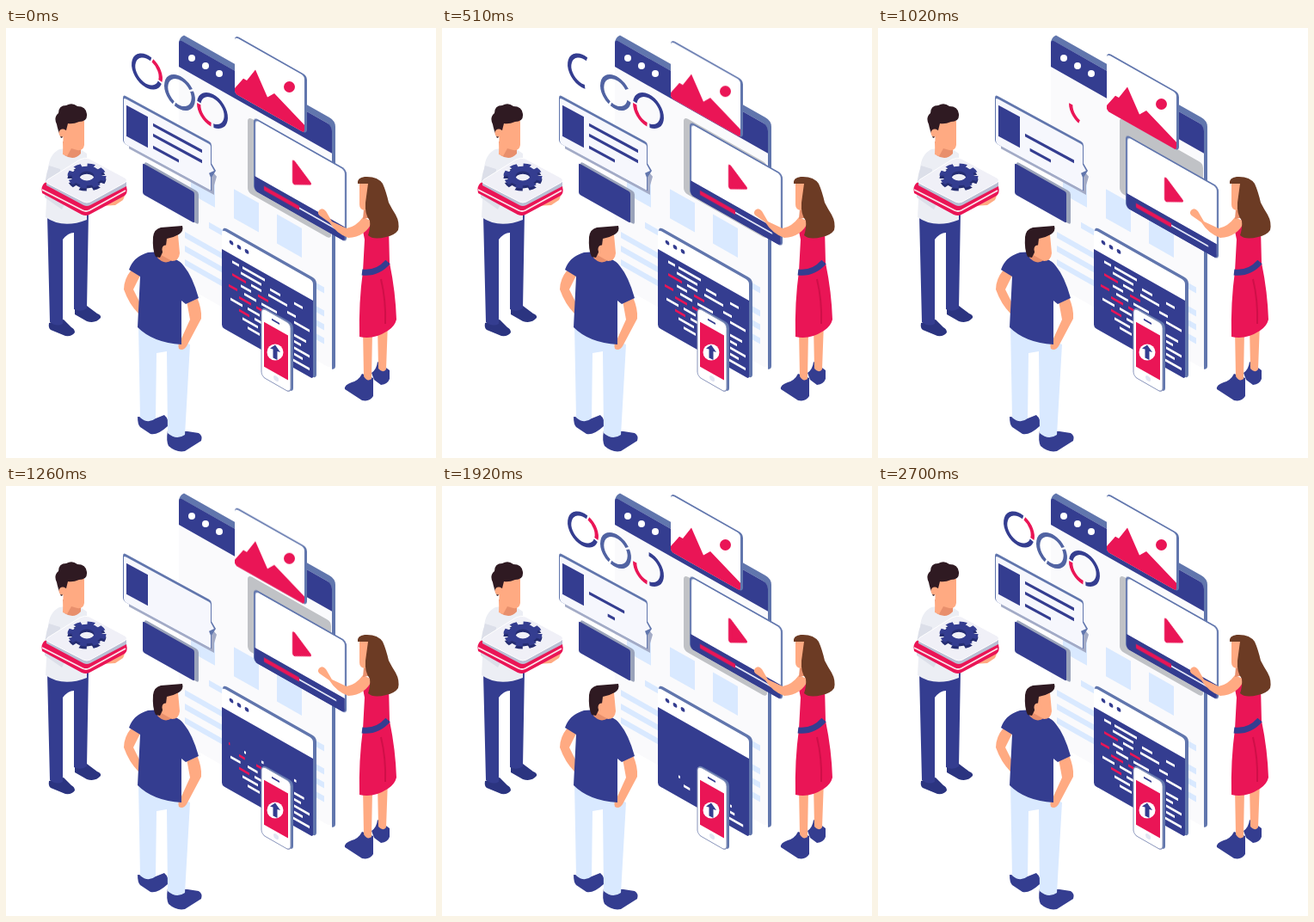
Write an HTML page that moves like this. It is 500 px wide and 500 px high and loops after 2.73 s.

```html
<!DOCTYPE html>
<html lang="en">
<head>
<meta charset="utf-8">
<title>Team building an interface</title>
<style>
  html, body { margin: 0; height: 100%; overflow: hidden; background: #fff; }
  svg { display: block; width: 100%; height: 100%; }
  .blue { fill: #343d90; }
  .navy { fill: #2b3480; }
  .edge { fill: #6176ad; }
  .red { fill: #ea1556; }
  .pale { fill: #d9e9ff; }
  .face { fill: #fafafc; }
  .white { fill: #fff; }
  .skin { fill: #ffaa82; }
  .shade { fill: #e88f6c; }
  .hair { fill: #2f1a22; }
  .line { fill: none; stroke: #343d90; stroke-width: 3.6; }
  .bob { animation: bob 2730ms infinite; }
  @keyframes bob {
    0%, 8.4% { transform: none; animation-timing-function: ease-in-out; }
    37.7%, 39.6% { transform: translateY(20px); animation-timing-function: ease-in-out; }
    60.1%, 100% { transform: none; }
  }
</style>
</head>
<body>
<svg viewBox="0 0 500 500">
  <defs id="defs"></defs>

  <!-- page -->
  <g transform="translate(201 13) skewY(29.5)">
    <path class="edge" d="M0 5Q0-2 6-8H175q7 0 7 7V277q0 4-4 6V20z"/>
    <rect class="face" width="178" height="283" rx="6"/>
    <path class="blue" d="M0 32V5q0-5 5-5h167q6 0 6 6v26z"/>
    <g class="pale">
      <rect x="14" y="139" width="28" height="33"/>
      <rect x="64" y="138" width="29" height="34"/>
      <rect x="114" y="139" width="29" height="34"/>
      <rect x="35" y="193" width="134" height="7"/>
      <rect x="7" y="220" width="162" height="7"/>
      <rect x="7" y="236" width="162" height="7"/>
      <rect x="7" y="252" width="162" height="7"/>
    </g>
  </g>
  <g class="white">
    <circle cx="216" cy="35" r="4"/>
    <circle cx="232" cy="44" r="4"/>
    <circle cx="248" cy="53" r="4"/>
  </g>
  <rect transform="translate(281 103) skewY(29.5)" width="97" height="88" rx="5" fill="#c0c2c6"/>

  <g id="rings"></g>

  <!-- speech bubble -->
  <g transform="translate(137 80) skewY(28.5)">
    <path fill="#a3abc6" d="M6 3H102V30l6 4-3 12v11H6z"/>
    <path class="edge" d="M2-2H99q3 0 3 3V22l5 6-5 10V54H3q-4 0-4-4V2q0-4 3-4z"/>
    <path fill="#f6f7fd" d="M3 1H99q2 0 2 2V24l4 5-6 6 2 4V54H3q-3 0-3-3V3q0-2 3-2z"/>
    <rect class="blue" x="3" y="8" width="25" height="36"/>
    <path id="text1" class="line" d="M34 14H91" pathLength="100"/>
    <path id="text2" class="line" d="M34 26H91" pathLength="100"/>
    <path id="text3" class="line" d="M34 40H64" pathLength="100"/>
  </g>

  <!-- label -->
  <g transform="translate(159 157) skewY(29.5)">
    <rect fill="#9aa3ba" x="2" y="-3" width="63" height="38" rx="3"/>
    <rect class="blue" width="60" height="36" rx="2"/>
  </g>

  <!-- picture -->
  <g class="bob">
    <g transform="translate(266 10) skewY(29.5)">
      <rect class="edge" y="-2" width="84" height="68" rx="5"/>
      <rect class="white" width="81" height="66" rx="4"/>
      <path class="red" d="M0 64V60L10 43h4L24 25 38 49 46 40 81 57v6q0 3-3 3H2z"/>
    </g>
    <circle class="red" cx="329.500" cy="68.500" r="6.500"/>
  </g>

  <!-- video -->
  <g class="bob">
    <g transform="translate(289 106) skewY(29.5)">
      <rect class="edge" x="-1" y="-2" width="108" height="85" rx="5"/>
      <rect class="white" x="1" width="104" height="81" rx="4"/>
      <path class="blue" d="M0 66H105V79q0 4-4 4H4q-4 0-4-4z"/>
      <path class="red" d="M46 24V48L64 38z" stroke="#ea1556" stroke-width="4" stroke-linejoin="round"/>
      <path d="M52 74H95" stroke="#dfe3f5" stroke-width="2"/>
      <path d="M11 74H52" stroke="#ea1556" stroke-width="5"/>
    </g>
  </g>

  <!-- code window -->
  <g transform="translate(251 234) skewY(29.5)">
    <rect class="edge" x="1" y="-4" width="109" height="116" rx="5"/>
    <rect class="white" width="106" height="113" rx="4"/>
    <path class="blue" d="M0 23H106V111q0 3-3 3H3q-3 0-3-3z"/>
    <g class="blue">
      <circle cx="11" cy="9.500" r="2.400"/>
      <circle cx="20" cy="9.500" r="2.400"/>
      <circle cx="29" cy="9.500" r="2.400"/>
    </g>
    <g id="code" fill="none" stroke-width="3"></g>
  </g>

  <!-- phone -->
  <g transform="translate(297 325) skewY(29.5)">
    <rect class="edge" x="1" y="-2" width="36" height="80" rx="5"/>
    <rect class="white" width="34" height="80" rx="5" stroke="#8793ba"/>
    <rect class="red" x="3" y="15" width="28" height="52"/>
    <path d="M12 7H21" stroke="#343d90" stroke-width="2"/>
    <circle cx="17" cy="73" r="3" fill="#e1e5f2"/>
  </g>
  <circle class="white" cx="313" cy="377" r="9.500"/>
  <path class="blue" d="M313 368.500l6 8.500-3.500-1v10l-5-2.500v-10l-3.500-1z"/>

  <!-- man with the gear -->
  <g>
    <path class="navy" d="M50 343q-1 6 2 8l17 7q8 1 11-4 0-4-4-6l-9-9zM80 325v8l14 8q10 3 16-4 1-3-4-5l-12-9z"/>
    <path class="blue" d="M48 218L51 342q8 6 15 2V246q6-8 13-8V327q8 4 15-1L96 214z"/>
    <path fill="#eceef4" d="M62 141q-12 6-13 23l-3 56q20 14 48 3V146L82 138z"/>
    <path class="shade" d="M66 132H87V146q-8 9-19 2z"/>
    <path class="skin" d="M67 108H91V136q-1 7-8 6l-7-2-5 9-5-2z"/>
    <path class="hair" d="M64 128q-4-10-5-16-4-8 2-13 0-9 9-9 7-4 13 1 10 0 11 9 1 9-9 9-7 3-13 2l-2 8q-6-2-4 8z"/>
    <circle class="skin" cx="66" cy="122" r="4.500"/>
    <path class="skin" d="M96 209l20-12 18-6q6 3 2 9l-9 6-16 1-11 6z"/>
    <path fill="#dcdfe9" d="M50 160q-6 17-5 37l20 14 5-10-8-13 1-24z"/>
    <path class="red" d="M45 180q-5 4-3 12L88 217q5 2 9 0l41-22q4-3 2-11L93 170z"/>
    <path d="M42 188L89 212q4 2 8 0l42-23" fill="none" stroke="#fbe3ea" stroke-width="1.800"/>
    <path fill="#b9bfd4" d="M47 178v5L90 206q4 2 8 0l42-22v-5z"/>
    <path fill="#f0f0f7" d="M49 176L86 153q6-3 11-1l41 22q5 3 0 6L98 202q-4 2-8 0L49 181q-4-2 0-5z" stroke="#fff"/>
    <g transform="translate(94 172) scale(1 .64)" fill="none">
      <g id="gear" stroke="#252d72" transform="translate(0 5)">
        <circle r="13" stroke-width="9"/>
        <circle r="19.500" stroke-width="6" stroke-dasharray="8.300 7.015"/>
      </g>
      <g stroke="#343d90">
        <circle r="13" stroke-width="9"/>
        <circle r="19.500" stroke-width="6" stroke-dasharray="8.300 7.015"/>
      </g>
    </g>
  </g>

  <!-- man with hands on hips -->
  <g>
    <path class="blue" d="M153 452q0 9 3 12l12 8q8 2 20-9 2-8-4-13l-10 4zM188 468q-2 12 1 18 9 8 19 6l19-12q2-6-3-9l-13-2z"/>
    <path class="pale" d="M154 345l2 108q9 8 18 1l1-76 12-2 1 95q10 9 20 2l6-105z"/>
    <path class="skin" d="M146 281q-9 11-9 23 6 17 17 28l2-12-8-16 8-16zM210 317l12-4q6 14 5 25l-17 32q-4 6-9 3-2-6 3-12l10-22z"/>
    <path class="blue" d="M165 261q-17 5-22 20l13 8-3 59q18 18 51 20V317l5 4 15-7q-7-25-17-37-4-6-12-9l-14-8z"/>
    <path class="shade" d="M176 255h17v15q-9 6-17-3z"/>
    <path class="skin" d="M178 240h22l2 22q-1 9-9 9l-16-9z"/>
    <path class="hair" d="M174 266q-4-8-3-23 1-9 9-11l25-2q2 6-4 10-7 4-14 5l-1 8q-5-1-4 8l-3 6z"/>
    <circle class="skin" cx="186" cy="257" r="4.500"/>
  </g>

  <!-- woman -->
  <g>
    <path class="blue" d="M414 402q-4 8-12 10-9 3-8 8l20 13q9 2 13-5V407zM432 388q-1 9-7 13l3 8 8 6q8-1 10-7v-10z"/>
    <path class="skin" d="M415 350l1 55q4 7 9 3l1-55zM432 345l1 51q5 6 9 1l2-55z"/>
    <path class="red" d="M424 221l-9 15 2 10-2 37q-5 36-4 76 16 4 33-7 8-5 10-13-1-32-8-66l-1-40-8-15z"/>
    <path class="skin" d="M364 212q4-4 8 1l7 12 17 8q11-2 19-13l11 5q-8 18-28 19-14-5-22-18l-10-7q-5-3-2-7z"/>
    <path d="M414 284q18 2 30-12" fill="none" stroke="#343d90" stroke-width="7"/>
    <path d="M436 292q6 25 5 52" fill="none" stroke="#cf0f48" stroke-width="2"/>
    <path class="shade" d="M417 200h10v20l-12 2z"/>
    <path class="skin" d="M411 181h14v30l-8 1q-6-1-6-7z"/>
    <path fill="#6c3b24" d="M409 181q-1-7 8-8 15-1 21 8 4 9 7 22 3 6 8 14 5 9 3 18-4 6-14 8-15 4-21-2 3-9 2-17-6-7-5-21l3-22z"/>
  </g>
</svg>
<script>
const LOOP = 2730;
const BLUE = '#343d90', RED = '#ea1556', STEEL = '#5163a2';
const $ = id => document.getElementById(id);

function add(parent, tag, attrs) {
  const el = document.createElementNS('http://www.w3.org/2000/svg', tag);
  for (const k in attrs) el.setAttribute(k, attrs[k]);
  return parent.appendChild(el);
}

// Undraw a stroke between out[0] and out[1], redraw it between back[0] and back[1] (ms).
function redraw(el, out, back, hidden = 101) {
  el.style.strokeDasharray = '100 200';
  const key = (time, offset) => ({ offset: time / LOOP, strokeDashoffset: offset });
  el.animate([
    key(0, 0), key(out[0], 0), key(out[1], hidden),
    key(back[0], hidden), key(back[1], 0), key(LOOP, 0)
  ], { duration: LOOP, iterations: Infinity });
}

const ARC = 'M0-17a17 17 0 0 0 0 34a17 17 0 0 0 0-34';

function ring(id, x, y, turn, parts, out, back) {
  const mask = add($('defs'), 'mask', {
    id, maskUnits: 'userSpaceOnUse', x: -30, y: -30, width: 60, height: 60
  });
  const wipe = add(mask, 'path', {
    d: ARC, pathLength: 100, fill: 'none', stroke: '#fff', 'stroke-width': 8
  });
  const g = add($('rings'), 'g', {
    transform: `translate(${x} ${y}) matrix(.93 .43 0 1 0 0) rotate(${turn})`,
    mask: `url(#${id})`, fill: 'none', 'stroke-width': 4.6
  });
  for (const [from, len, color] of parts) {
    add(g, 'path', {
      d: ARC, pathLength: 100, stroke: color,
      'stroke-dasharray': `${len} 200`, 'stroke-dashoffset': -from
    });
  }
  redraw(wipe, out, back);
}

ring('ring1', 164, 50.5, 17, [[0, 74, BLUE], [76, 22, RED]], [270, 835], [1340, 1800]);
ring('ring2', 202, 75, 56, [[0, 58, STEEL], [60, 38, STEEL]], [440, 1020], [1430, 1890]);
ring('ring3', 240, 96, -88, [[0, 24, RED], [27, 71, BLUE]], [590, 1130], [1560, 2040]);

redraw($('text1'), [800, 1000], [2000, 2250]);
redraw($('text2'), [1030, 1250], [1740, 1990]);
redraw($('text3'), [980, 1200], [1850, 2100], -101);

// Each row: x, length pairs; a negative length is red.
const rows = [
  [12, 8, 24, 26],
  [22, 24, 56, 12, 84, 10],
  [12, -16, 34, 12, 54, 22],
  [22, 12, 42, -12, 76, 10],
  [8, -10, 26, 14, 46, 18, 84, 18],
  [20, -14, 40, -12, 60, 16],
  [10, 14, 30, 14, 84, 14],
  [20, -12, 38, 8, 84, 8],
  [24, 18, 84, 18],
  [30, 14, 84, 10],
  [56, 46]
];
rows.forEach((row, i) => {
  const late = rows.length - 1 - i;
  for (let k = 0; k < row.length; k += 2) {
    const x = row[k], len = row[k + 1];
    const dash = add($('code'), 'path', {
      d: `M${x} ${31 + i * 7.4}h${Math.abs(len)}`,
      pathLength: 100, stroke: len < 0 ? RED : '#fff'
    });
    const out = 1040 + i * 34, back = 1780 + late * 62;
    redraw(dash, [out, out + 100], [back, back + 150]);
  }
});
</script>
</body>
</html>
```
